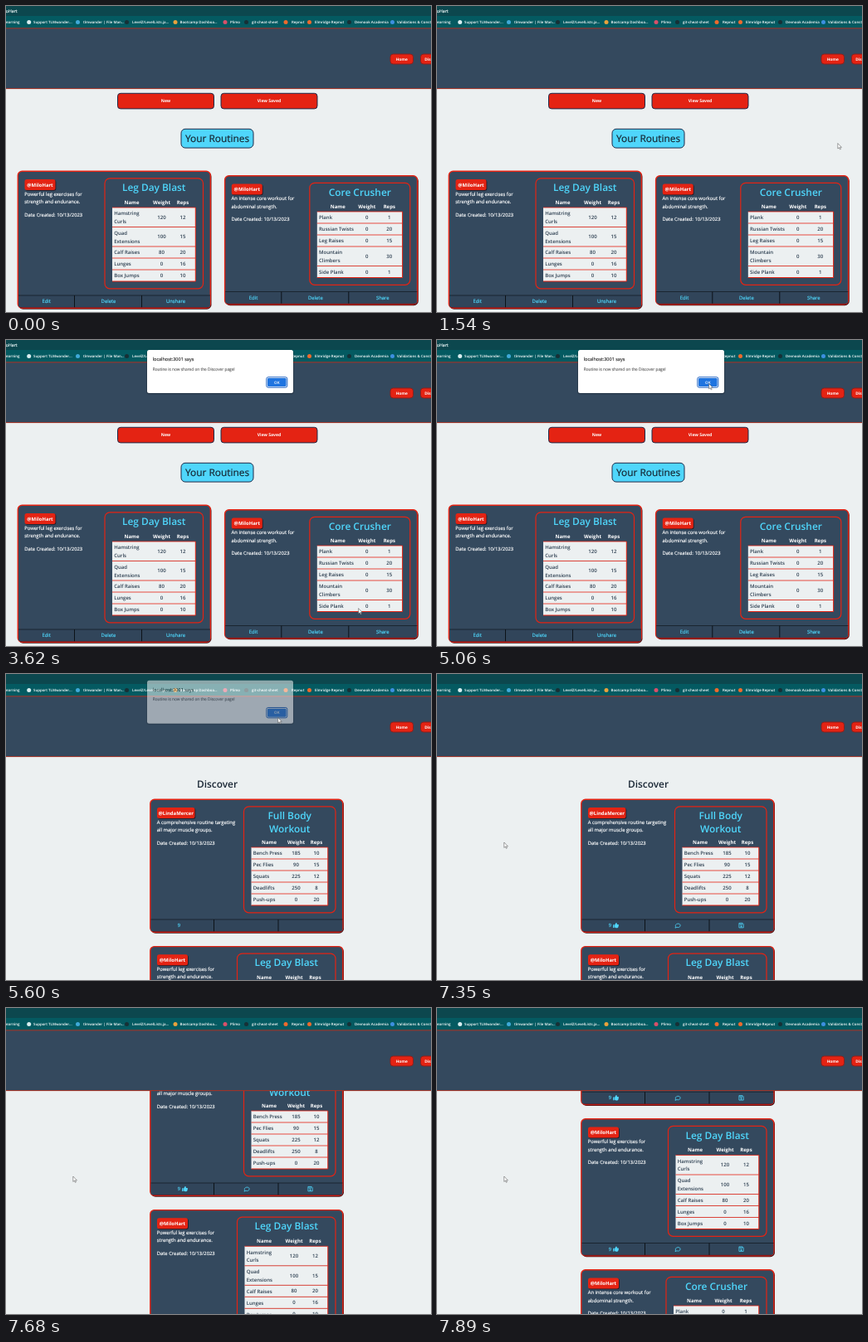
An HTML page that plays this animation: 512x369 px, repeating every 8 s.

```html
<!DOCTYPE html>
<html lang="en">
<head>
<meta charset="utf-8">
<title>Workout routines</title>
<style>
  html, body { margin: 0; width: 100%; height: 100%; overflow: hidden; background: #ecf0f1; }
  svg { display: block; width: 100vw; height: 100vh; text-rendering: geometricPrecision;
        font-family: "Open Sans", "Noto Sans", sans-serif; }
</style>
</head>
<body>
<svg id="stage" viewBox="0 0 512 369" preserveAspectRatio="none"></svg>
<script>
const LOOP = 8000;
const RED = '#e42313', SLATE = '#34495e', CYAN = '#4fd6fb', PALE = '#ecf0f1', INK = '#2c3e50', NAVY = '#1d2b4a';

const rect = (x, y, w, h, fill, more = '') =>
  `<rect x="${x}" y="${y}" width="${w}" height="${h}" fill="${fill}" ${more}/>`;
const line = (x1, y1, x2, y2, color, w = 1) =>
  `<path d="M${x1} ${y1}L${x2} ${y2}" stroke="${color}" stroke-width="${w}"/>`;
// A hairline stroke keeps tiny regular text crisp.
const text = (s, x, y, size, fill, weight = 400, anchor = 'start', more = '') =>
  `<text x="${x}" y="${y}" font-size="${size}" fill="${fill}" font-weight="${weight}" text-anchor="${anchor}"
    stroke="${fill}" stroke-width="${weight === 400 ? .16 : 0}" ${more}>${s}</text>`;
const mid = (s, x, y, size, fill, weight, more) => text(s, x, y, size, fill, weight, 'middle', more);
const group = (id, body, more = '') => `<g id="${id}" ${more}>${body}</g>`;

const button = (x, y, w, h, label, size, edge = NAVY) =>
  rect(x, y, w, h, RED, `rx="3.5" stroke="${edge}"`) +
  mid(label, x + w / 2, y + h / 2 + size * .37, size, '#fff', 700);

const USER = '@MiloHart';
const leg = {
  user: USER, badge: 37, title: ['Leg Day Blast'], top: 44, cols: [105, 137.5, 173.5, 199],
  about: ['Powerful leg exercises for', 'strength and endurance.'],
  rows: [['Hamstring Curls', 120, 12], ['Quad Extensions', 100, 15], ['Calf Raises', 80, 20],
         ['Lunges', 0, 16], ['Box Jumps', 0, 10]]
};
const core = {
  user: USER, badge: 37, title: ['Core Crusher'], top: 43.5, cols: [102.5, 136.5, 171.5, 198.5],
  about: ['An intense core workout for', 'abdominal strength.'],
  rows: [['Plank', 0, 1], ['Russian Twists', 0, 20], ['Leg Raises', 0, 15],
         ['Mountain Climbers', 0, 30], ['Side Plank', 0, 1]]
};
const full = {
  user: '@LindaMercer', badge: 45.5, title: ['Full Body', 'Workout'], top: 58, cols: [113, 143.5, 176, 200.5],
  about: ['A comprehensive routine targeting', 'all major muscle groups.'],
  rows: [['Bench Press', 185, 10], ['Pec Flies', 90, 15], ['Squats', 225, 12],
         ['Deadlifts', 250, 8], ['Push-ups', 0, 20]]
};
const WRAPPED = /^(Hamstring|Quad|Mountain) /;

function table(c) {
  const left = c.cols[0] + 9, right = 214.3;
  let y = c.top, out = '';
  ['Name', 'Weight', 'Reps'].forEach((h, i) => out += mid(h, c.cols[i + 1], y - 4.3, 6, '#fff', 700));
  for (const [name, ...nums] of c.rows) {
    const words = WRAPPED.test(name) ? name.split(' ') : [name];
    const h = words.length > 1 ? 23.5 : 14;
    out += rect(left, y, right - left, h, PALE) + line(left, y, right, y, RED, .8);
    words.forEach((w, i) => out += text(w, left + 2.2, y + 9.4 + i * 9.6, 6, INK, 600));
    nums.forEach((n, i) => out += mid(n, c.cols[i + 2], y + h / 2 + 2.2, 6, INK, 600));
    y += h;
  }
  return [out + line(left, y, right, y, RED) + line(right, c.top, right, y, RED), y];
}

function card(c, x, y, splits, footer) {
  const [rows, end] = table(c), foot = end + 17, inner = c.cols[0];
  let s = rect(1, 1.2, 232.5, foot + 15.5, '#3a1016', 'rx="5.5"') +
    rect(.3, .3, 232, foot + 15, SLATE, `rx="5" stroke="${RED}" stroke-width="1.4"`) +
    rect(9.3, 10.8, c.badge, 13, '#1f1a26', 'rx="2.5"') +
    rect(8.5, 10, c.badge, 13, RED, 'rx="2.5"') +
    mid(c.user, 8.5 + c.badge / 2, 18.6, 5.9, '#fff', 700);
  [...c.about, 'Date Created: 10/13/2023'].forEach((t, i) =>
    s += text(t, 8.3, [29.8, 39.2, 54.8][i], 5.85, '#fff'));
  s += rect(inner, 8.8, 223.5 - inner, end, 'none', `rx="6" stroke="${RED}" stroke-width="1.2"`);
  c.title.forEach((t, i) => s += mid(t, (inner + 223.5) / 2, 24.2 + i * 15.6, 11.9, CYAN, 600));
  s += rows + rect(1, foot, 230.8, 14.3, '#31455a', 'rx="2"') + line(1, foot, 232, foot, '#1a2530');
  splits.forEach(p => s += line(p, foot, p, foot + 14.5, '#0c1218'));
  s += line(3, foot + 14.7, 230, foot + 14.7, '#5b1520', .8);
  return `<g transform="translate(${x} ${y})">${s}<g transform="translate(0 ${foot + 9.2})">${footer}</g></g>`;
}

const links = (labels, xs) => labels.map((l, i) =>
  mid(l, xs[i], 0, 5.9, CYAN, 400, l === 'Share' ? 'id="share"' : '')).join('');

const ICONS = mid('9', 35, 0, 5.9, CYAN) + `<g class="icon" fill="${CYAN}">
  <path d="M38.6-2.9h1.5v3.8h-1.5zM40.6-2.7L42.2-5.3q1.6-.2 1.1 2h1.8q.7.6.1 1.3.5.8-.2 1.3 0 1.5-1.4 1.7h-1.5l-1.5-.6z"/>
  <g fill="none" stroke="${CYAN}" stroke-width=".8">
    <path d="M113.5 1l.5-1.7c-1.6-3.6 5.6-4.9 5.6-1.2 0 2.2-2.7 2.7-4.2 2z"/>
    <path d="M190.4-4.8h4.2l1.1 1.1v4.4h-5.3zM191.6-4.6v1.7h2.5v-1.7"/>
  </g><circle cx="193" cy="-.8" r="1"/></g>`;
const shared = (c, y) => card(c, 173.5, y, [77, 154.5], ICONS);

const bookmarks = [
  [27.7, 33, '#d8eef0', 'Support TLMwander...'], [86.5, 93, '#3fa9d8', 'tlmwander | File Man...'],
  [145.5, 152, '#173036', 'LevelZ/LevelLists.ja...'], [204, 209.5, '#e8a13c', 'Bootcamp Dashboa...'],
  [264, 270, '#d8506a', 'Plimo'], [289.5, 296, '#173036', 'git-cheat-sheet'],
  [337, 344, '#ee6a2c', 'Repnut'], [365.5, 372, '#ee6a2c', 'Elmridge Repnut'],
  [413.5, 420, '#173036', 'Devnook Academia'], [465.5, 471, '#3d8fe0', 'Validations &amp; Constraints']
];

const header = rect(0, 0, 512, 12.5, '#0c474e') + rect(0, 12, 512, 16, '#045a61') +
  text('loHart', -1.5, 8, 5.2, '#e8f4f4', 400, 'start', 'id="tab"') +
  text('earning', 0, 21.2, 4.5, '#fff', 600) +
  bookmarks.map(([cx, x, color, t]) =>
    `<circle cx="${cx}" cy="19.5" r="2.5" fill="${color}"/>` + text(t, x, 21.2, 4.4, '#fff', 600)).join('') +
  rect(0, 26.5, 512, 73.5, SLATE) + line(0, 26.9, 512, 26.9, '#b5301f', .9) + line(0, 99.6, 512, 99.6, '#b5301f', .9) +
  button(463, 58, 27.5, 12, 'Home', 4.8, '#8c1f1c') + button(499.5, 58, 30, 12, 'Discover', 4.8, '#8c1f1c');

const dialogBox = rect(169, 12.5, 178, 53, '#000', 'rx="3" opacity=".18"') +
  rect(170, 12, 176, 52, '#fff', 'rx="2.5"') +
  text('localhost:3001 says', 176.7, 25.4, 5.5, '#333') +
  text('Routine is now shared on the Discover page!', 176.7, 36.6, 4.8, '#666') +
  rect(313.8, 44.8, 25, 12.4, '#fff', 'rx="2" stroke="#1b5fc0" stroke-width="1"') +
  rect(315, 46, 22.6, 10, '#1f74e0', 'rx="1.2"') + mid('OK', 326.3, 52.7, 4.6, '#fff', 600);

const cursors = `<g fill="#fff" stroke="#444" stroke-width=".5">
  <path id="arrow" d="M0 0V6.4L1.5 5.1 2.6 7.4 3.6 6.9 2.6 4.8H4.6Z"/>
  <path id="hand" d="M0 .8Q.8-.5 1.5.8V3.1L4.6 3.9Q5.3 4.2 5.1 5.5L4.3 8.4H.9L-1.6 5.3Q-1.5 4.2 0 5.2Z"/></g>`;

document.getElementById('stage').innerHTML = rect(0, 0, 512, 369, PALE) +
  group('routines', button(134.5, 105.3, 116, 18.6, 'New', 5.1) + button(259, 105.3, 116, 18.6, 'View Saved', 5.1) +
    rect(211, 148.3, 87, 22.8, CYAN, `rx="5" stroke="${NAVY}"`) + mid('Your Routines', 254.5, 164.2, 11.9, '#14202c') +
    card(leg, 14, 199, [68.5, 149.5], links(['Edit', 'Delete', 'Unshare'], [34.7, 109.5, 190.5])) +
    card(core, 263.3, 204.5, [68.5, 149.5], links(['Edit', 'Delete', 'Share'], [34.7, 109.5, 190.5]))) +
  group('discover', mid('Discover', 254.5, 136.6, 11.9, '#1b2836', 600) +
    shared(full, 151) + shared(leg, 328.3) + shared(core, 510.3)) +
  header + group('dialog', dialogBox) + group('cursor', cursors);

const moves = [
  [1470, 2230, 12, [494, 161], [250, 260], [354, 320]],
  [2300, 2740, 7, [358, 322], [410, 342], [448.8, 345.5]],
  [3420, 4100, 11, [444, 338], [350, 270], [271, 177]],
  [4160, 4930, 12, [272, 174], [290, 100], [326, 55]],
  [4990, 5060, 2, [327, 54], [327, 53], [327.6, 52.6]],
  [6070, 6820, 12, [324, 55], [210, 130], [88, 185]],
  [6890, 6940, 2, [84, 196], [82, 200], [80.8, 203]]
];
const scrolls = [0, 9, 31, 58, 85, 114, 143, 171, 194.8];
const stepAt = (t, t0, t1, n) => Math.max(0, Math.min(n - 1, Math.floor((t - t0) / ((t1 - t0) / (n - 1)) + .01)));

function cursorAt(t) {
  const m = moves.filter(v => t >= v[0]).pop();
  if (!m) return null;
  const [t0, t1, n, a, b, c] = m;
  const k = stepAt(t, t0, t1, n) / (n - 1), u = k * k * (3 - 2 * k);
  return [0, 1].map(i => a[i] * (1 - u) ** 2 + 2 * b[i] * u * (1 - u) + c[i] * u * u);
}

function dialogAlpha(t) {
  if (t < 3490 || t >= 5740) return 0;
  if (t < 3560) return .5;
  return t < 5530 ? 1 : [.85, .52, .12][stepAt(t, 5530, 5670, 3)];
}

const $ = id => document.getElementById(id);
const show = (el, on) => el.style.display = on ? '' : 'none';
const icons = document.querySelectorAll('.icon');

function draw(t) {
  const onDiscover = t >= 5530, hovering = t >= 2560 && t < 3420;
  show($('routines'), !onDiscover);
  show($('discover'), onDiscover);
  show($('tab'), !onDiscover);
  icons.forEach(el => show(el, t >= 5670));
  $('share').setAttribute('opacity', hovering ? .65 : 1);
  $('discover').setAttribute('transform', `translate(0 ${-scrolls[stepAt(t, 7350, 7890, 9)]})`);

  const alpha = dialogAlpha(t);
  $('dialog').setAttribute('opacity', alpha);
  $('dialog').setAttribute('transform', `translate(0 ${-9 * (1 - alpha)})`);

  const p = cursorAt(t);
  show($('cursor'), p);
  if (p) $('cursor').setAttribute('transform', `translate(${p})`);
  show($('hand'), hovering);
  show($('arrow'), !hovering);
}

const start = performance.now();
function frame() {
  draw((performance.now() - start) % LOOP);
  requestAnimationFrame(frame);
}
frame();
</script>
</body>
</html>
```
